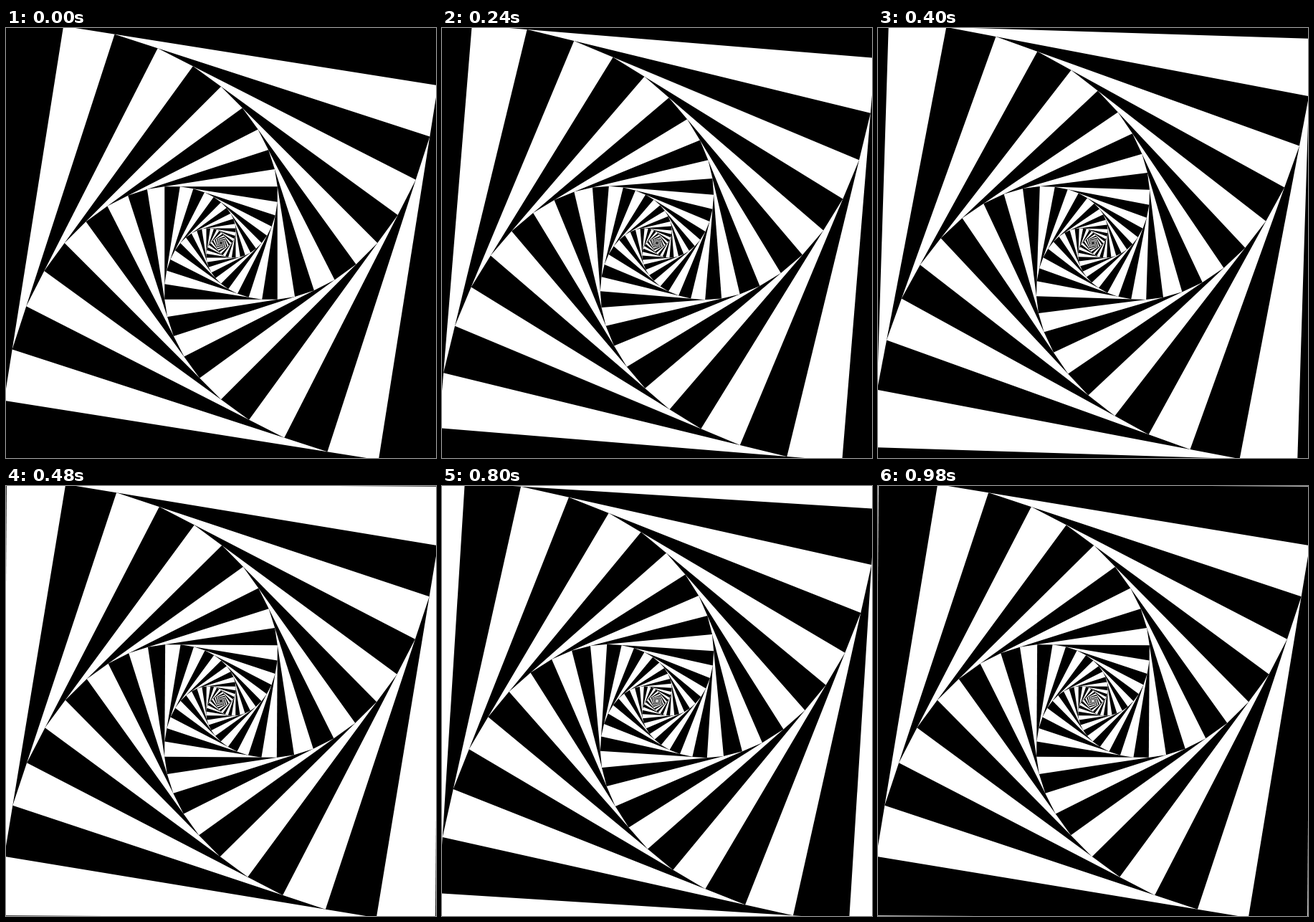
Animation, 600 px wide and 600 px high, one loop 1 s. Source, as an HTML page with a canvas:

```html
<!DOCTYPE html>
<html>
<head>
<meta charset="utf-8">
<style>
  html, body { margin: 0; width: 100%; height: 100%; overflow: hidden; background: #000; }
  canvas { display: block; }
</style>
</head>
<body>
<canvas id="stage" width="600" height="600"></canvas>
<script>
const ctx = document.getElementById('stage').getContext('2d');
const COLORS = ['#000', '#fff'];
const STEP = Math.PI / 20;                              // turn between nested squares
const RATIO = 1 / (Math.cos(STEP) + Math.sin(STEP));    // each square touches the one around it
const RADIUS = 428;                                     // centre to corner of the unturned square
const COUNT = 40;
const FRAME = 20, HALF = 25;                            // ms per step, steps until colours swap

function square(level, color) {
  const r = RADIUS * RATIO ** level;
  ctx.fillStyle = color;
  ctx.beginPath();
  for (let i = 0; i < 4; i++) {
    const a = level * STEP + (2 * i - 3) * Math.PI / 4;
    ctx.lineTo(300 + r * Math.cos(a), 300 + r * Math.sin(a));
  }
  ctx.fill();
}

function draw(ms) {
  const n = Math.floor(ms % 1000 / FRAME);
  const swap = n < HALF ? 0 : 1;
  const shift = n % HALF / HALF;
  ctx.fillStyle = COLORS[swap];
  ctx.fillRect(0, 0, 600, 600);
  for (let k = 1; k <= COUNT; k++) square(k - shift, COLORS[(k + swap) % 2]);
}

let start;
function tick(now) {
  start ??= now;
  draw(now - start);
  requestAnimationFrame(tick);
}
draw(0);
requestAnimationFrame(tick);
</script>
</body>
</html>
```
